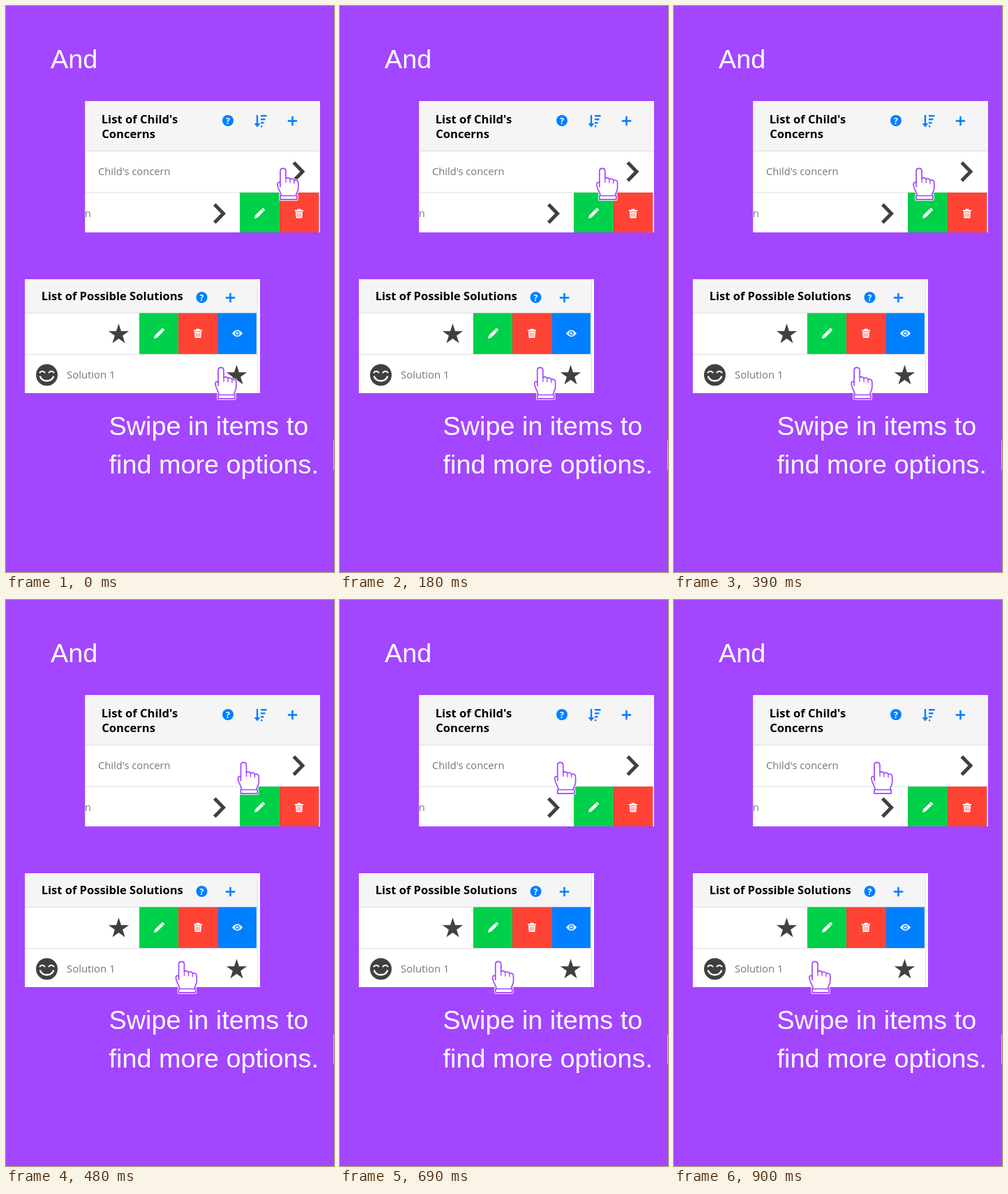
An HTML page with a canvas that plays this animation: 470 by 810 pixels, repeating every 930 ms.

```html
<!DOCTYPE html>
<html lang="en">
<head>
<meta charset="utf-8">
<title>Swipe hint</title>
<style>
  html, body { margin: 0; width: 100%; height: 100%; overflow: hidden; background: #a346ff; }
  canvas { display: block; }
</style>
</head>
<body>
<canvas id="stage" width="470" height="810"></canvas>
<script>
const ctx = document.getElementById('stage').getContext('2d');
const LOOP = 930, STEP = 30, TRAVEL = 106;
const PURPLE = '#a346ff', BLUE = '#0080ff', GREEN = '#00d04a', RED = '#ff4435';
const DARK = '#404040', GREY = '#767676', LINE = '#dedede', HEADER = '#f5f5f5';
const UI = '"Open Sans", "Noto Sans", sans-serif';
const CAPTION = '37.8px "Liberation Sans", Arial, sans-serif';

function rect(color, x, y, w, h) {
  ctx.fillStyle = color;
  ctx.fillRect(x, y, w, h);
}

function text(str, x, y, font, color) {
  ctx.font = font;
  ctx.fillStyle = color;
  ctx.fillText(str, x, y);
}

function stroke(color, width, path) {
  ctx.strokeStyle = color;
  ctx.lineWidth = width;
  ctx.stroke(path);
}

function at(x, y, draw) {
  ctx.save();
  ctx.translate(x, y);
  draw();
  ctx.restore();
}

function disc(color, r) {
  ctx.fillStyle = color;
  ctx.beginPath();
  ctx.arc(0, 0, r, 0, Math.PI * 2);
  ctx.fill();
}

function help() {
  disc(BLUE, 8);
  ctx.textAlign = 'center';
  text('?', 0, 4.6, `700 12.5px ${UI}`, '#fff');
}

function plus() {
  rect(BLUE, -6.7, -1.3, 13.4, 2.6);
  rect(BLUE, -1.3, -6.7, 2.6, 13.4);
}

function sortIcon() {
  rect(BLUE, -5.2, -8.5, 2.4, 14);
  ctx.fill(new Path2D('M-8.5 3.5H.5L-4 9Z'));
  for (let i = 0; i < 4; i++) rect(BLUE, 1, -8.5 + i * 5, 8.6 - i * 2.1, 2.4);
}

function chevron() {
  stroke(DARK, 5, new Path2D('M-6.7 -13L6 0L-6.7 13'));
}

function star() {
  ctx.beginPath();
  for (let i = 0; i < 10; i++) {
    const r = i % 2 ? 5.9 : 15.4, a = i * Math.PI / 5;
    ctx.lineTo(r * Math.sin(a), -r * Math.cos(a));
  }
  ctx.fillStyle = DARK;
  ctx.fill();
}

function smiley() {
  disc(DARK, 15.5);
  ctx.lineCap = 'round';
  stroke('#fff', 2, new Path2D('M-10 -3.5Q-6.5 -7 -3 -3.5M3 -3.5Q6.5 -7 10 -3.5'));
  stroke('#fff', 2.4, new Path2D('M-9.5 2.5C-6 10.5 6 10.5 9.5 2.5'));
}

function pencil() {
  ctx.rotate(Math.PI / 4);
  ctx.fillStyle = '#fff';
  ctx.fill(new Path2D('M-2.3 -8.6Q-2.3 -9.6 -1.3 -9.6H1.3Q2.3 -9.6 2.3 -8.6V-7H-2.3ZM-2.3 -6.2H2.3V6L0 10L-2.3 6Z'));
}

function trash() {
  ctx.fillStyle = '#fff';
  ctx.fill(new Path2D('M-6 -5H-2.5V-6.5H2.5V-5H6V-3H-6ZM-5 -2.2H5L4.3 6.6H-4.3Z'));
  stroke(RED, .8, new Path2D('M-2.2 -.8V5M0 -.8V5M2.2 -.8V5'));
}

function eye() {
  ctx.fillStyle = '#fff';
  ctx.fill(new Path2D('M-7.5 0Q0 -9.4 7.5 0Q0 9.4 -7.5 0Z'));
  disc(BLUE, 3.2);
  disc('#fff', 1.8);
}

const HAND = new Path2D(
  'M-4 23V5C-4 -.4 4 -.4 4 5V15.5C6 13.6 9.4 14 10 16.5C12 15 15.4 15.5 16 18.2' +
  'C18.5 17 21.8 18 21.8 21.5V29C21.8 34 18.8 35.5 18.4 40H-2.6' +
  'C-2.8 35 -7.5 31 -8 24.5C-8.2 20.5 -5 19.8 -4 23V27' +
  'M-4 40H20V45.4H-4Z');
const FOLDS = new Path2D('M4 15V21M10 16.5V21.5M16 18.2V22.5');

function hand() {
  ctx.lineJoin = 'round';
  ctx.lineCap = 'round';
  stroke('#fff', 3.6, HAND);
  ctx.fillStyle = '#fff';
  ctx.fill(HAND);
  stroke(PURPLE, 1.7, HAND);
  stroke(PURPLE, 1.3, FOLDS);
}

function concernsCard() {
  const title = `700 16.6px ${UI}`, label = `14.7px ${UI}`;
  rect('#fff', 113, 136, 337, 188);
  rect(HEADER, 113, 136, 337, 71);
  rect(LINE, 113, 207, 337, 1);
  rect(LINE, 113, 266.5, 337, 1);
  rect(LINE, 113, 136, 1, 188);
  text("List of Child's", 136.7, 168, title, '#000');
  text('Concerns', 137.2, 189, title, '#000');
  at(318, 164, help);
  at(364, 164.5, sortIcon);
  at(410.5, 164.5, plus);
  text("Child's concern", 132, 242, label, GREY);
  text('n', 112.8, 302, label, GREY);
  at(419, 237, chevron);
  at(305.5, 297, chevron);
  rect(GREEN, 335, 267, 57, 57);
  rect(RED, 392, 267, 56.5, 57);
  at(363, 297, pencil);
  at(420, 297, trash);
}

function solutionsCard() {
  rect('#fff', 27, 391, 337, 163);
  rect(HEADER, 27, 391, 333, 48);
  rect(LINE, 27, 439, 333, 1);
  rect(LINE, 27, 498, 333, 1);
  rect(LINE, 360, 391, 1, 163);
  text('List of Possible Solutions', 50.7, 421, `700 16.5px ${UI}`, '#000');
  at(280.5, 417, help);
  at(321.5, 417.5, plus);
  at(161.5, 470, star);
  rect(GREEN, 191, 439.5, 56, 58.5);
  rect(RED, 247, 439.5, 57, 58.5);
  rect(BLUE, 304, 439.5, 55, 58.5);
  at(219, 469, pencil);
  at(275, 468.5, trash);
  at(331.5, 468.5, eye);
  at(58.5, 528, smiley);
  text('Solution 1', 87, 533, `14.9px ${UI}`, GREY);
  at(330.5, 529, star);
}

function render(now) {
  const step = Math.floor((now % LOOP) / STEP);
  const shift = TRAVEL * step / (LOOP / STEP - 1);
  rect(PURPLE, 0, 0, 470, 810);
  rect('#d6b0ff', 469, 622, 1, 42);
  text('And', 64, 89, CAPTION, '#fff');
  concernsCard();
  solutionsCard();
  text('Swipe in items to', 147.5, 614, CAPTION, '#fff');
  text('find more options.', 147.5, 669, CAPTION, '#fff');
  at(397 - shift, 231.5, hand);
  at(308 - shift, 516.5, hand);
}

let start;
function tick(now) {
  start ??= now;
  render(Math.max(0, now - start));
  requestAnimationFrame(tick);
}
render(0);
requestAnimationFrame(tick);
</script>
</body>
</html>
```
